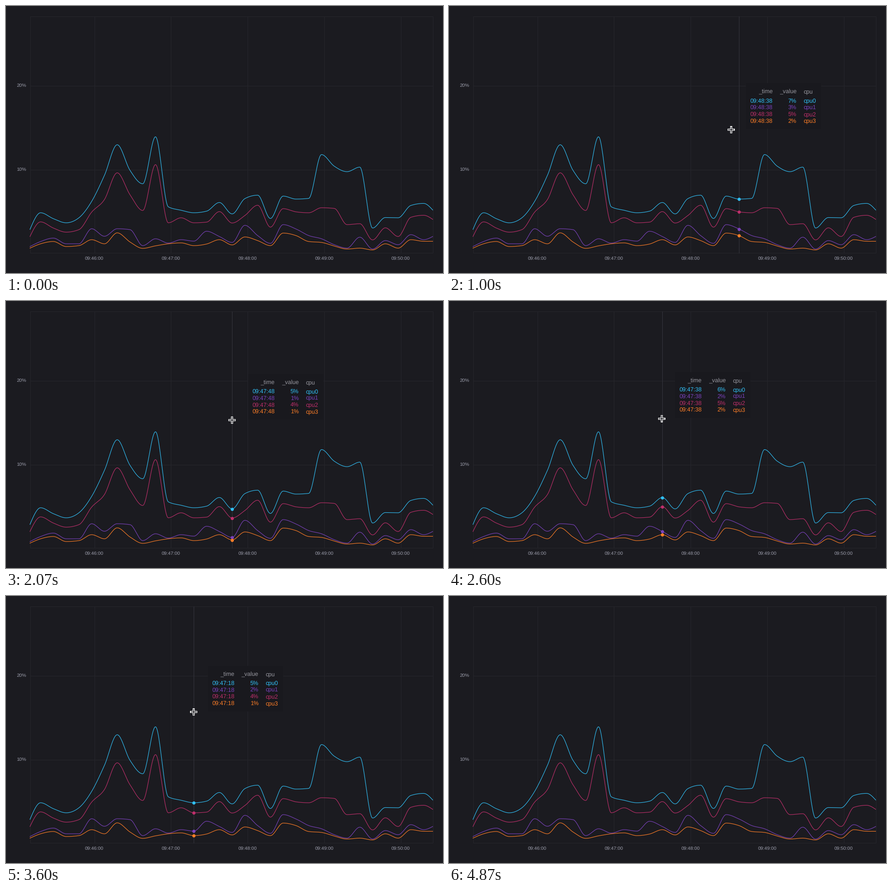
Animation, 957 px wide and 585 px high, one loop 5790 ms. Source, as a matplotlib script:

```python
import numpy as np
import matplotlib.pyplot as plt
from matplotlib.animation import FuncAnimation
from matplotlib.patches import Rectangle

W, H, DPI = 957, 585, 100
PX = 72 / DPI
LEFT, RIGHT, TOP, BOTTOM = 52.5, 934.5, 22.5, 540.5
FRAMES, INTERVAL = 193, 30
FPS = 15
START, END = 3, 73          # ticks during which the pointer is on stage

BG, TIP_BG, GRID, HOVER = "#1b1b20", "#19191e", "#26262c", "#36363e"
LABEL, HEAD = "#9b9dab", "#97979f"

# Curve heights in pixels, one sample per ten seconds
SERIES = [
    ("cpu0", "#31c0f6", [
        489.5, 453, 466, 475, 464, 428, 371, 304, 360, 389.5, 286.5,
        440, 447.5, 453, 449.5, 430.5, 455.5, 422, 414.5, 465.5, 416.5,
        423, 421.5, 325.5, 351, 363, 353, 486.5, 463.5, 464, 437, 432.5, 447]),
    ("cpu1", "#7b42bd", [
        527, 516, 508.5, 521, 521, 488, 504.5, 488, 490, 525, 510,
        519.5, 512, 515.2, 493.5, 505, 518, 480.5, 503, 520, 479,
        488.5, 503, 510, 523, 530.5, 506.5, 532.5, 514, 523, 501, 512, 505]),
    ("cpu2", "#bf2f6b", [
        505, 473, 486.5, 495.5, 490, 451.5, 424, 365.5, 413.5, 448, 347.5,
        475, 464, 475, 473.5, 450.5, 475.5, 459, 436.5, 484.5, 444,
        451, 453, 442, 443.5, 479, 477, 512.5, 486, 505, 463, 458.5, 467.5]),
    ("cpu3", "#ff7e27", [
        530.5, 521, 516, 527, 525, 512, 521, 497, 517, 531, 525.5,
        521, 519, 525, 521.5, 512, 523.5, 506, 514, 525, 497.5,
        503, 516, 518, 526, 532.5, 530.5, 534.5, 521, 530.5, 512, 515.5, 515.5]),
]
STEP = 27.96
XS = np.r_[52.5, 75.8 + STEP * np.arange(31), 934.5]

# Pointer path: tick, x, y
PATH = np.array([
    (3, 778, 17), (4, 753, 104), (5, 729, 168), (6, 706, 214), (7, 686, 247),
    (8, 664, 266), (9, 660, 271), (10, 648, 272), (11, 643, 272),
    (19, 592.5, 270.5), (20, 592, 270), (21, 585, 270), (28, 518, 264),
    (29, 508, 262.5), (30, 504, 262), (31, 495, 261), (37, 472, 258.5),
    (38, 469, 258), (47, 439, 256.5), (48, 438, 256.5), (55, 407, 254),
    (65, 407, 254), (66, 409, 252), (67, 416, 240), (68, 438, 208),
    (69, 474, 160), (70, 524, 102), (71, 573, 45), (72, 605, 8)])


def pointer(tick):
    return (np.interp(tick, PATH[:, 0], PATH[:, 1]),
            np.interp(tick, PATH[:, 0], PATH[:, 2]))


def monotone(x, y, n=24):
    """Monotone cubic curve through the points."""
    x, y = np.asarray(x, float), np.asarray(y, float)
    h = np.diff(x)
    s = np.diff(y) / h
    p = (s[:-1] * h[1:] + s[1:] * h[:-1]) / (h[:-1] + h[1:])
    m = np.zeros(len(x))
    low = np.minimum(np.abs(s[:-1]), np.abs(s[1:]))
    m[1:-1] = (np.sign(s[:-1]) + np.sign(s[1:])) * np.minimum(low, np.abs(p) / 2)
    m[0] = (3 * s[0] - m[1]) / 2
    m[-1] = (3 * s[-1] - m[-2]) / 2
    u = np.linspace(0, 1, n, endpoint=False)[None, :]
    a, b, d = y[:-1, None], y[1:, None], h[:, None]
    cy = (a * (1 + 2 * u) * (1 - u) ** 2 + b * u * u * (3 - 2 * u)
          + d * m[:-1, None] * u * (1 - u) ** 2
          + d * m[1:, None] * u * u * (u - 1))
    cx = x[:-1, None] + d * u
    return np.r_[cx.ravel(), x[-1]], np.r_[cy.ravel(), y[-1]]


plt.rcParams["font.family"] = "Liberation Sans"
plt.rcParams["text.hinting"] = "no_hinting"
plt.rcParams["toolbar"] = "None"
fig = plt.figure(figsize=(W / DPI, H / DPI), dpi=DPI, facecolor=BG)
ax = fig.add_axes([0, 0, 1, 1])
ax.set_xlim(0, W)
ax.set_ylim(H, 0)
ax.axis("off")


def line(xs, ys, color, width=1, z=1, **kw):
    return ax.plot(xs, ys, color=color, lw=width * PX, zorder=z, **kw)[0]


def label(x, y, text, size, color, ha="left", z=1):
    return ax.text(x, y, text, fontsize=size * PX, color=color, ha=ha,
                   va="baseline", zorder=z)


# Grid and axes
for k in range(5):
    x = 193.5 + 167.76 * k
    line([x, x], [TOP, BOTTOM], GRID)
    label(x, 557, f"09:{46 + k}:00", 10.5, LABEL, "center")
for y, text in ((174.5, "20%"), (359, "10%")):
    line([LEFT, RIGHT], [y, y], GRID)
    label(44, y + 3.2, text, 10.5, LABEL, "right")
ax.add_patch(Rectangle((LEFT, TOP), RIGHT - LEFT, BOTTOM - TOP, fill=False,
                       ec=GRID, lw=PX, zorder=1))

hover = line([0, 0], [TOP, BOTTOM], HOVER, z=2)
for name, color, ys in SERIES:
    line(*monotone(XS, ys), color, 1.15, 3, solid_joinstyle="round")
dots = [line([0], [0], color, z=4, marker="o", ms=7 * PX, mew=0)
        for name, color, ys in SERIES]

# Tooltip: a panel and cells placed relative to its anchor
panel = ax.add_patch(Rectangle((0, 0), 165, 100, fc=TIP_BG, ec="none", zorder=5))
COLS = ((84.5, "right"), (137, "right"), (152.7, "left"))
cells = []


def add_row(dy, texts, color):
    row = [label(0, 0, s, 12.6, color, ha, 6) for s, (dx, ha) in zip(texts, COLS)]
    cells.extend((c, dx, dy) for c, (dx, ha) in zip(row, COLS))
    return row


add_row(-79.7, ("_time", "_value", "cpu"), HEAD)
rows = [add_row(-60 + 14.7 * i, ("", "", name), color)
        for i, (name, color, ys) in enumerate(SERIES)]

cross = [line([], [], c, w, z, solid_capstyle="butt")
         for c, w, z in (("white", 4.4, 8), ("#15151a", 1.5, 9))]
ARMS = (8, 6.6)

tip_parts = [hover, panel] + dots + [c for c, dx, dy in cells]


def show_tip(x, y):
    k = 1 + int(np.clip(round((x - XS[1]) / STEP), 0, 30))
    secs = 18 + 10 * (k - 1)
    clock = f"09:{45 + secs // 60}:{secs % 60:02d}"
    hover.set_xdata([XS[k], XS[k]])
    panel.set_xy((x + 26, y - 102))
    for c, dx, dy in cells:
        c.set_position((x + dx, y + dy))
    for dot, row, (name, color, ys) in zip(dots, rows, SERIES):
        dot.set_data([XS[k]], [ys[k]])
        row[0].set_text(clock)
        row[1].set_text(f"{(543 - ys[k]) / 18.45:.0f}%")


def update(i):
    tick = (i * INTERVAL + 20) * FPS // 1000
    active = START <= tick < END
    cx, cy = pointer(tick)
    for part, r in zip(cross, ARMS):
        part.set_visible(active)
        part.set_data([cx - r, cx + r, np.nan, cx, cx],
                      [cy, cy, np.nan, cy - r, cy + r])
    # The tooltip trails the pointer by one tick
    tx, ty = pointer(tick - 1)
    shown = active and ty > TOP
    for part in tip_parts:
        part.set_visible(shown)
    if shown:
        show_tip(tx, ty)
    return tip_parts + cross


anim = FuncAnimation(fig, update, frames=FRAMES, interval=INTERVAL,
                     init_func=lambda: update(0), repeat=True,
                     repeat_delay=0, blit=False)
plt.show()
```
